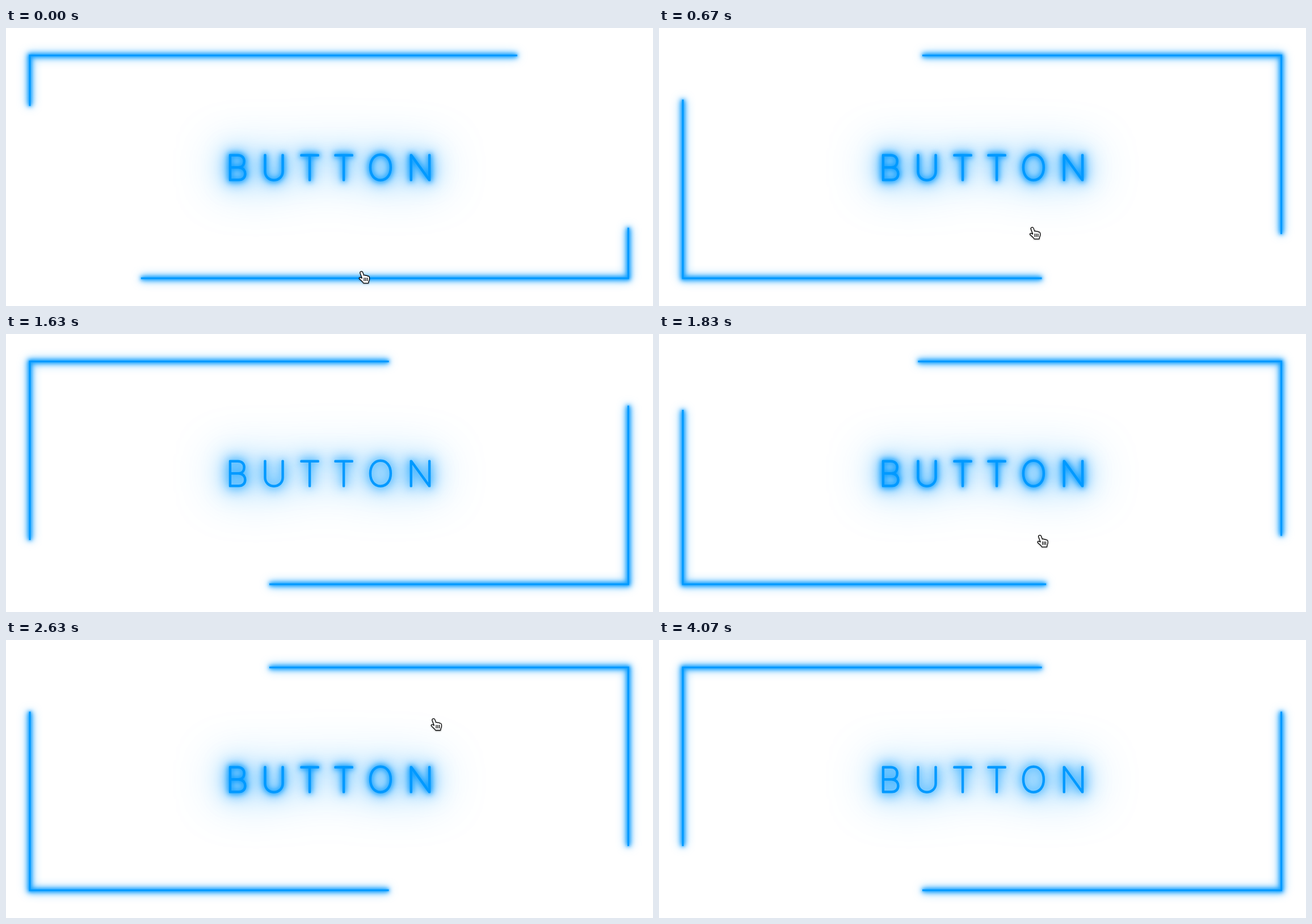
Write an HTML page that moves like this. It is 1140 by 491 pixels and loops after 4.11 s.

```html
<!DOCTYPE html>
<html lang="en">
<head>
<meta charset="utf-8">
<title>Neon button</title>
<style>
  html, body { margin: 0; width: 100%; height: 100%; overflow: hidden; background: #fff; }
  svg { display: block; width: 100%; height: 100%; }
  #frame, #word { stroke: #09f; stroke-width: var(--w, 3px); }
  #frame { fill: none; stroke-dasharray: 948 500; }
  #word { font: 100 62px Inter, sans-serif; text-anchor: middle; fill: #09f; stroke-linejoin: round; }
  .glow { filter: blur(var(--blur)); }
  #hand { filter: drop-shadow(0 1px 1px rgba(0, 0, 0, .35)); }
</style>
</head>
<body>
<svg viewBox="0 0 1140 491">
  <use href="#word" class="glow" style="--blur: 44px; --w: 6px"/>
  <use href="#word" class="glow" style="--blur: 20px; --w: 4.5px"/>
  <use href="#word" class="glow" style="--blur: 10px; --w: 4.5px"/>
  <use href="#word" class="glow" style="--blur: 5px; --w: 5.5px" id="halo"/>
  <text id="word" x="407 472 535 595 660 730" y="268.5">BUTTON</text>

  <use href="#frame" class="glow" style="--blur: 9px; --w: 4px"/>
  <use href="#frame" class="glow" style="--blur: 5px; --w: 7px"/>
  <use href="#frame" class="glow" style="--blur: 2.5px"/>
  <path id="frame" d="M42 245V48.5H1096.5V442H42Z"/>

  <g id="hand" stroke="#000" stroke-width="1.3" stroke-linejoin="round" stroke-linecap="round">
    <path fill="#fff" d="M4.2 1.2C5.8.4 7.2 1.3 7.7 2.8L9.6 8C10.8 7 12.3 7.4 12.7 8.4C13.8 7.6 15.4 8 15.8 9.2C17.3 8.6 18.9 9.5 19.2 11C19.8 14 19.6 16 18.2 18.2L17.6 21.6H9C8 19.5 5 17.3 1.8 14.2C.6 13 1.6 11 3.4 11.6L6.4 13L3 4C2.6 2.6 3 1.7 4.2 1.2Z"/>
    <path fill="none" d="M10 12.5V17.5M12.8 12.5V17.5M15.6 12.5V17.5"/>
  </g>
</svg>
<script>
  const LOOP = 4110, STEP = 100 / 3;
  const TRAVEL = 737.5, EASE_MS = 200;

  // Each visit: hover begins and ends, with the pointer's path as [ms, x, y].
  const visits = [
    { from: -41, to: 1020, path: [[0, 621, 429], [200, 638, 355], [500, 654, 303], [980, 643, 485]] },
    { from: 1660, to: 2960, path: [[1660, 640, 460], [2000, 688, 272], [2633, 748, 138], [2910, 808, -15]] }
  ];

  const $ = id => document.getElementById(id);
  const frame = $('frame'), halo = $('halo'), hand = $('hand');

  const bez = (a, b, u) => 3 * a * u * (1 - u) ** 2 + 3 * b * u * u * (1 - u) + u ** 3;

  // The CSS "ease" curve.
  function ease(x) {
    if (x <= 0) return 0;
    if (x >= 1) return 1;
    let lo = 0, hi = 1;
    for (let i = 0; i < 20; i++) {
      const mid = (lo + hi) / 2;
      if (bez(0.25, 0.25, mid) < x) lo = mid; else hi = mid;
    }
    return bez(0.1, 1, lo);
  }

  // Smooth curve through the points, with speeds taken from their neighbours.
  function along(path, t, axis) {
    const last = path.length - 1;
    const slope = i => {
      const a = path[Math.max(0, i - 1)], b = path[Math.min(last, i + 1)];
      return (b[axis] - a[axis]) / (b[0] - a[0]);
    };
    const i = Math.max(1, path.findIndex(p => p[0] >= t));
    const a = path[i - 1], b = path[i];
    const span = b[0] - a[0], u = (t - a[0]) / span, v = 1 - u;
    return v * v * (1 + 2 * u) * a[axis] + u * u * (1 + 2 * v) * b[axis]
      + u * v * span * (v * slope(i - 1) - u * slope(i));
  }

  function draw(ms) {
    const t = Math.floor((ms + 3.4) / STEP) * STEP;
    const visit = visits.find(v => t >= v.from && t < v.to);
    const p = visit ? ease((t - visit.from) / EASE_MS) : 0;
    frame.style.strokeDashoffset = 119 - TRAVEL * p;
    halo.style.opacity = visit ? 1 : 0.2;

    const shown = visit && t <= visit.path[visit.path.length - 1][0];
    hand.style.display = shown ? '' : 'none';
    if (shown) {
      const x = along(visit.path, t, 1), y = along(visit.path, t, 2);
      hand.setAttribute('transform', `translate(${x.toFixed(1)} ${y.toFixed(1)})`);
    }
  }

  const begin = performance.now();
  function tick() {
    draw((performance.now() - begin) % LOOP);
    requestAnimationFrame(tick);
  }
  tick();
</script>
</body>
</html>
```
